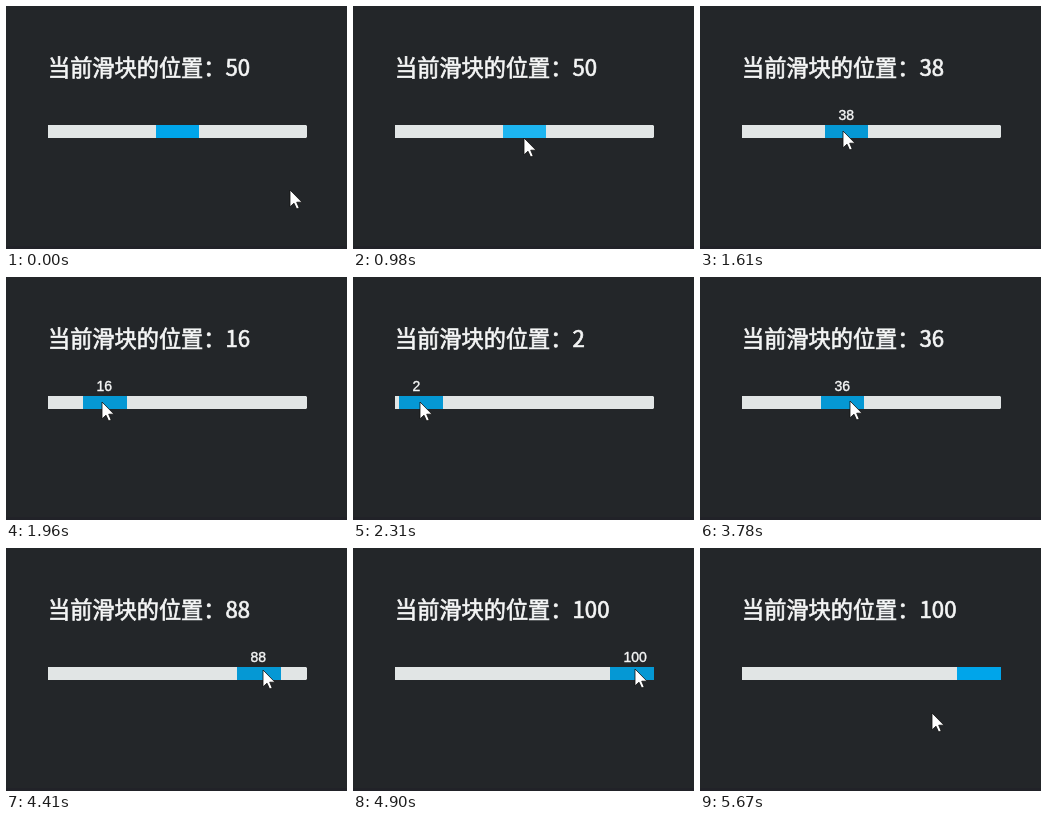
Animation of 341x243 px, one loop 6300 ms. Source, as an HTML page:

```html
<!DOCTYPE html>
<html lang="zh-CN">
<head>
<meta charset="utf-8">
<title>滑块</title>
<style>
  html, body { margin: 0; width: 100%; height: 100%; overflow: hidden; background: #232629; }
  svg { display: block; }
  text { fill: #f4f5f5; stroke: #f4f5f5; }
  #label { font: 22.2px "Noto Sans CJK SC", "Noto Sans CJK", sans-serif; stroke-width: .7; }
  #tip { font: 14px "Liberation Sans", sans-serif; stroke-width: .4; }
</style>
</head>
<body>
<svg width="341" height="243" viewBox="0 0 341 243">
  <rect width="341" height="243" fill="#232629"/>
  <rect y="240" width="341" height="3" fill="#212228"/>
  <text id="label" x="42" y="70"></text>
  <path d="M42 119H300L301 120V131L300 132H42Z" fill="#e1e5e5"/>
  <rect id="handle" y="119" height="13"/>
  <text id="tip" y="114"></text>
  <path id="cursor" d="M0 0V16.8L4 13.2L6.6 19L9.2 18L6.7 12.2H12Z" fill="#fff" stroke="#111" stroke-width=".8"/>
</svg>
<script>
const LOOP = 6300, STEP = 70;
const LEAD = 25; // ms by which the pointer runs ahead of the handle
const [label, handle, tip, cursor] =
  ['label', 'handle', 'tip', 'cursor'].map(id => document.getElementById(id));

const mix = (a, b, p) => a + (b - a) * p;
const progress = (t, from, to) => Math.min(1, Math.max(0, (t - from) / (to - from)));
const within = (t, from, to) => t >= from && t < to;

// Drag left, then drag right: [time, value]
const drags = [
  [1330, 50], [1610, 38.6], [1960, 16.3], [2310, 2], [2450, 0],
  [3360, 0], [3780, 36.7], [4410, 88], [4900, 100]
];

function valueAt(t) {
  const i = drags.findIndex(([time]) => time > t);
  if (i === 0) return 50;
  if (i < 0) return 100;
  const [t0, v0] = drags[i - 1], [t1, v1] = drags[i];
  return mix(v0, v1, progress(t, t0, t1));
}

const handleX = t => 42 + valueAt(t) * 2.15;

function pointerAt(t) {
  const arrive = progress(t, 420, 980), settle = progress(t, 980, 1120);
  const leave = progress(t, 5180, 5670);
  const grab = mix(21, 24.5, progress(t, 2800, 2940));
  const dragX = handleX(t < 1330 ? t : t + LEAD) + grab;
  const dragY = mix(125, 121, progress(t, 3360, 4900));
  const x = mix(284, dragX, arrive);
  const y = mix(184, mix(132, dragY, settle), arrive);
  return [mix(x, 232, leave), mix(y, 165, leave)];
}

function draw(now) {
  const t = Math.floor(now % LOOP / STEP) * STEP;
  const pressed = within(t, 1330, 2730) || within(t, 3360, 5110);
  const hover = within(t, 980, 1330);
  const value = Math.floor(valueAt(t));
  const left = Math.round(handleX(t)), right = Math.floor(handleX(t) + 44);
  const [x, y] = pointerAt(t).map(Math.round);

  label.textContent = '当前滑块的位置：' + value;
  handle.setAttribute('x', left);
  handle.setAttribute('width', right - left);
  handle.setAttribute('fill', pressed ? '#0598d4' : hover ? '#1db5f0' : '#00a5ea');
  tip.textContent = pressed ? value : '';
  tip.setAttribute('x', left + 13.5);
  cursor.setAttribute('transform', `translate(${x} ${y})`);
}

const start = performance.now();
function frame() {
  draw(performance.now() - start);
  requestAnimationFrame(frame);
}
frame();
</script>
</body>
</html>
```
